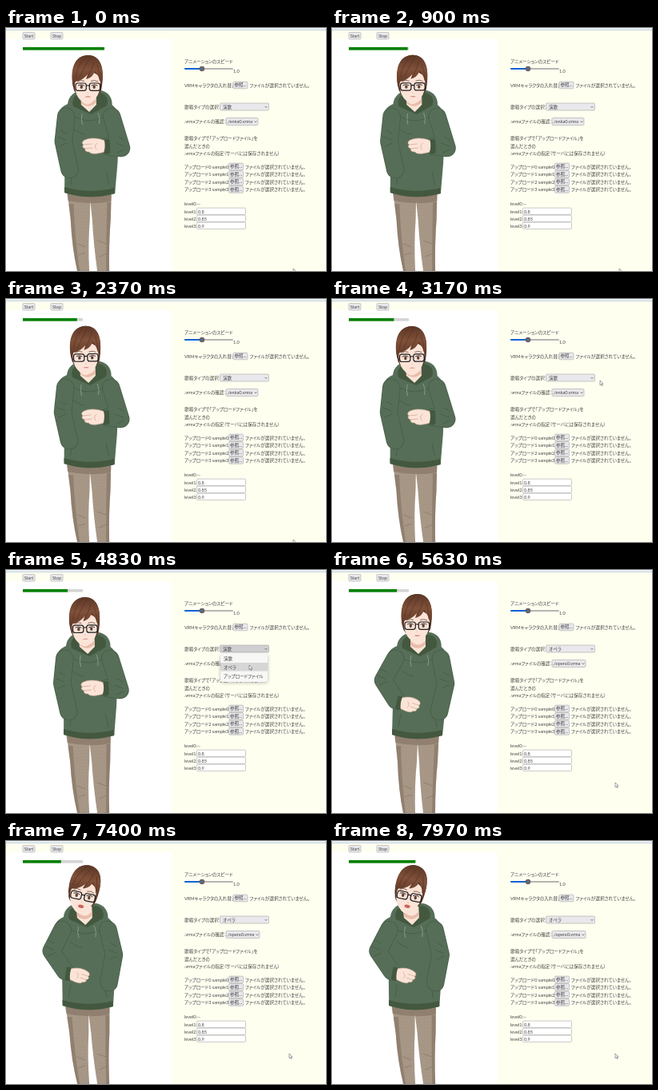
These frames come from a looping animation (400x304 px, 8 s). An HTML page:

```html
<!DOCTYPE html>
<html lang="ja">
<head>
<meta charset="utf-8">
<style>
  html, body { margin: 0; width: 100%; height: 100%; overflow: hidden; background: #fffff0; }
  svg { display: block; width: 400px; height: 304px; }
  text { font: 5.6px Lato, "Noto Sans CJK JP", "Noto Sans CJK", sans-serif; font-feature-settings: "palt"; fill: #444; white-space: pre; }
  .cloth { fill: #566e57; }
  .shade { fill: #43583f; }
  .fold { fill: none; stroke: #465c45; stroke-width: .9; stroke-linecap: round; }
  .skin { fill: #fbe4d7; }
  .sleeve { fill: none; stroke-linecap: round; stroke-linejoin: round; }
  .line { fill: none; stroke: #c99884; stroke-width: .6; stroke-linecap: round; }
</style>
</head>
<body>
<svg viewBox="0 0 400 304">
  <defs>
    <linearGradient id="hairTone" x2="0" y2="1">
      <stop stop-color="#5b3625"/><stop offset=".45" stop-color="#80513a"/><stop offset="1" stop-color="#5a3424"/>
    </linearGradient>
    <pattern id="weave" width="3" height="4" patternUnits="userSpaceOnUse">
      <rect width="3" height="4" fill="#ab9b8b"/>
      <path d="M0 4L3 0" stroke="#95836f" stroke-width=".6"/>
    </pattern>
    <filter id="soft" x="-20%" y="-20%" width="140%" height="150%"><feGaussianBlur stdDeviation="2"/></filter>
  </defs>
  <rect width="400" height="304" fill="#fffff0"/>
  <rect width="400" height="2" fill="#e9f1f4"/>
  <rect y="2" width="400" height="1" fill="#c5d5dc"/>
  <rect y="14" width="207" height="290" fill="#fff"/>

  <rect x="21" y="24" width="75" height="3.6" fill="#d5d5d5"/>
  <rect id="meter" x="21" y="24" height="3.6" fill="#008000"/>

  <g id="figure">
    <path d="M78 200L82 240Q83 275 89 304H104Q103 270 106 240L107 216L109 240Q110 270 114 304H129Q129 270 132 240L134 200Z" fill="url(#weave)"/>
    <path d="M78 205H134L133 217Q106 222 79 216ZM82 240Q83 275 89 304H92Q87 265 86 220H80ZM132 240Q129 270 129 304H125Q126 260 128 218H133Z" fill="#7d6b5b" opacity=".5"/>
    <path d="M90 270l10 4M91 284l9-3M115 266l11 4M117 286l10-4" fill="none" stroke="#85705e" stroke-width=".6"/>

    <path class="cloth" d="M81 100C80 88 88 80 96 79L122 78C132 79 139 88 136 101L110 116Z"/>
    <path class="shade" d="M88 98C86 88 91 83 97 83L121 81C130 82 133 90 130 97L110 108Z"/>
    <path class="skin" d="M98 82H117V96L108 105L98 96Z"/>
    <path d="M98 88Q108 99 117 88V93Q108 102 98 94Z" fill="#e8bda9"/>
    <path class="cloth" d="M84 94C73 98 68 103 68 116L76 170L75 206Q106 216 138 207L142 170L146 112Q145 102 134 94Q124 106 109 109Q94 105 84 94Z"/>
    <path class="shade" d="M75 199Q106 208 138 200V207Q106 216 75 206Z"/>
    <path class="fold" d="M82 107Q96 116 109 116Q128 114 138 103M88 126Q96 133 102 133M86 180L83 196M128 180L131 196"/>
    <path d="M99 107Q97 115 99 121M119 106Q122 113 120 120" fill="none" stroke="#a0ab98" stroke-width=".7"/>
    <g id="arms"></g>
    <g id="hand">
      <path class="skin" stroke="#dcb5a3" stroke-width=".6" d="M-2-7C-12-11-22-11-29-7Q-32-4-29-2Q-32 1-27 3Q-28 7-22 7Q-20 10-12 9L-2 7Z"/>
      <path class="line" d="M-29-2L-19-3M-27 3L-18 2M-12-4Q-17 0-13 4"/>
      <path class="shade" d="M-3-8Q1-10 4-8L4 8Q0 11-4 8Q-1 0-3-8Z"/>
    </g>
  </g>

  <g id="head">
    <path d="M89 74C84 54 87 31 106 30C123 30 128 47 123 74L120 79H92Z" fill="#553224"/>
    <path class="skin" d="M90 58C89 74 92 82 98 87Q106 96 113 87C119 82 123 74 122 58Q106 42 90 58Z"/>
    <path d="M88 70C84 50 88 31 106 30C123 30 128 48 123 70C122 62 120 56 115 50C113 56 109 59 104 60L106 54C101 60 96 62 91 63Z" fill="url(#hairTone)"/>
    <path d="M104 32Q93 42 91 58M109 33Q101 46 96 58M114 38Q111 50 106 57M118 42Q122 52 121 62" fill="none" stroke="#54311f" stroke-width=".6"/>
    <path d="M93 63Q98 60.5 102 62.5M110 62.5Q115 60.5 119 63" fill="none" stroke="#6b483a" stroke-width=".8"/>
    <path d="M94 68Q98 65.5 102 68.2M110.5 68.2Q115 65.5 118.5 68" fill="none" stroke="#30201c" stroke-width=".9"/>
    <ellipse cx="98.3" cy="69.8" rx="1.7" ry="2.2" fill="#5a4238"/>
    <ellipse cx="114.2" cy="69.8" rx="1.7" ry="2.2" fill="#5a4238"/>
    <g fill="none" stroke="#1d1d20" stroke-width="1.2">
      <rect x="91" y="65" width="13.3" height="9.3" rx="2.8"/>
      <rect x="108.3" y="65" width="13.3" height="9.3" rx="2.8"/>
      <path d="M104.3 68.5Q106.3 67 108.3 68.5"/>
    </g>
    <path class="line" d="M106 77l.8 .8"/>
    <ellipse id="mouth" cx="106.5" rx="3.6" fill="#cb655c"/>
  </g>

  <g id="page"></g>

  <g id="menu">
    <rect x="268" y="106" width="59" height="35" rx="3" fill="#777" opacity=".55" filter="url(#soft)"/>
    <rect x="268" y="104" width="59" height="36" rx="3" fill="#f7f7f6"/>
    <rect id="hover" x="268" width="59" height="10.5" fill="#d6d6d6"/>
    <text x="272" y="112.5">演歌</text>
    <text x="272" y="123.5">オペラ</text>
    <text x="272" y="134.5">アップロードファイル</text>
  </g>
  <path id="cursor" d="M0 0V5.7L1.4 4.5L2.4 6.7L3.3 6.2L2.3 4.1H4.1Z" fill="#fff" stroke="#444" stroke-width=".5"/>
</svg>
<script>
const LOOP = 8000, MENU_OPEN = 4100, MENU_CLOSE = 5100, BEAT = 400;
const $ = id => document.getElementById(id);

const label = (x, y, text, id = "") => `<text x="${x}" y="${y}" ${id && `id="${id}"`}>${text}</text>`;
const box = (x, y, w, h, fill, id = "") =>
  `<rect x="${x}" y="${y}" width="${w}" height="${h}" rx="1.3" fill="${fill}" stroke="#a5a5a3" stroke-width=".6" ${id && `id="${id}"`}/>`;
const button = (x, y, w, text) =>
  box(x, y, w, 8.6, "#e9e9ed") + `<text x="${x + w / 2}" y="${y + 6.2}" text-anchor="middle">${text}</text>`;
const chevron = (x, y, id = "") =>
  `<path id="${id}" d="M${x} ${y}l1.5 1.5l1.5-1.5" fill="none" stroke="#555" stroke-width=".7"/>`;
const filePicker = (x, y) => button(x, y - 6.4, 18, "参照...") + label(x + 20.5, y, "ファイルが選択されていません。");

$("page").innerHTML = [
  button(21, 5.4, 15, "Start"), button(56, 5.4, 15, "Stop"),
  label(223, 44, "アニメーションのスピード"),
  `<rect x="223" y="50" width="61" height="2" rx="1" fill="#b5b5b3"/>
   <rect x="223" y="50" width="22" height="2" rx="1" fill="#0b62d6"/>
   <circle cx="245" cy="51" r="3.3" fill="#66666d"/>`,
  label(284, 56, "1.0"),
  label(223, 73.6, "VRMキャラクタの入れ替え"), filePicker(284, 73.6),
  label(223, 101, "歌唱タイプの選択："),
  box(267.5, 94, 61, 9, "#e9e9ed", "typeBox"), label(271, 101, "", "songType"), chevron(323.5, 98),
  label(223, 119, ".vrmaファイルの確認："),
  box(275, 112.5, 40, 9, "#e9e9ed", "fileBox"), label(276, 119, "", "fileName"),
  chevron(310.5, 116.5, "fileArrow"),
  label(223, 140, "歌唱タイプで「アップロードファイル」を"),
  label(223, 149.5, "選んだときの"),
  label(223, 158.8, ".vrmaファイルの指定（サーバには保存されません）"),
  ...[0, 1, 2, 3].map(i => label(223, 175.5 + i * 9.5, `アップロード${i} sample${i}`) + filePicker(278.5, 175.5 + i * 9.5)),
  label(223, 221.5, "level0:--"),
  ...["0.8", "0.85", "0.9"].map((value, i) => {
    const y = 231.5 + i * 9;
    return label(223, y, `level${i + 1}:`) + box(238.5, y - 6.4, 61, 8.3, "#fff") + label(240, y, value);
  })
].join("");

// Each key is [time, ...values].
const cursorKeys = [[2400, 359, 301], [2750, 390, 215], [3130, 335, 102], [3370, 335, 102], [3500, 346, 108],
  [3850, 320, 98], [4350, 320, 98], [4750, 304, 119], [5120, 304, 119], [5560, 354, 266]];
const meterKeys = [[0, 102], [1630, 80], [3170, 58], [4830, 58], [5630, 62], [6770, 74], [7970, 85]];
// head x, head y, head tilt, body lean, mouth opening
const poseKeys = [[0, -4, 4, 0, -4, .5], [1630, -6, 3.5, -1, -5, .5], [3170, -6, 4, -1, -5, .4], [4830, -7, 4, -1, -6, .4],
  [5100, -7, 4, -1, -6, .4], [5630, 0, 0, 0, 0, .6], [6770, -16, -1, 12, -10, 2.2], [7970, -15, -1, 12, -8, 2]];
// left elbow, left wrist, right elbow, right wrist
const armKeys = [[5120, 75, 142, 82, 177, 147, 150, 131, 148], [5420, 64, 138, 80, 163, 142, 142, 134, 177]];

const ease = p => p * p * (3 - 2 * p);

function sample(keys, t, curve = ease) {
  const next = keys.findIndex(key => key[0] > t);
  if (next === 0) return keys[0].slice(1);
  if (next < 0) return keys.at(-1).slice(1);
  const a = keys[next - 1], b = keys[next], p = curve((t - a[0]) / (b[0] - a[0]));
  return a.slice(1).map((value, i) => value + (b[i + 1] - value) * p);
}

const set = (id, attributes) => {
  for (const name in attributes) $(id).setAttribute(name, attributes[name]);
};

const sleeve = (sx, ex, ey, wx, wy) => {
  const d = `M${sx} 111L${ex} ${ey}L${wx} ${wy}`;
  return `<path class="sleeve" d="${d}" stroke="#465c45" stroke-width="22.5"/>
    <path class="sleeve" d="${d}" stroke="#566e57" stroke-width="21"/>
    <path class="fold" d="M${ex - 7} ${ey - 6}l10 4M${ex - 5} ${ey + 6}l9-4M${ex - 3} ${ey - 14}l7 4"/>`;
};

function drawSinger(t) {
  const [hx, hy, tilt, lean, mouth] = sample(poseKeys, t);
  const [lex, ley, lwx, lwy, rex, rey, rwx, rwy] = sample(armKeys, t);
  set("head", { transform: `translate(${hx} ${hy}) rotate(${tilt} 106 95)` });
  set("mouth", { cy: 82 + mouth * .2, ry: mouth });
  // The feet stay planted while the upper body leans.
  set("figure", { transform: `matrix(1 0 ${-lean * .005} 1 ${lean * 1.5} 0)` });
  $("arms").innerHTML = sleeve(79, lex, ley, lwx, lwy) + sleeve(136, rex, rey, rwx, rwy);
  set("hand", { transform: lwy < 170
    ? `translate(${lwx + 4} ${lwy + 3}) rotate(12) scale(-.85 .95)`
    : `translate(${rwx - 2} ${rwy})` });
}

function drawPage(t) {
  const opera = t >= MENU_CLOSE, open = t >= MENU_OPEN && !opera;
  const [x, y] = sample(cursorKeys, t);
  const dip = 32 * Math.sin(Math.PI * t / BEAT) ** 2;
  set("meter", { width: sample(meterKeys, t, p => p)[0] - dip });
  set("cursor", { transform: `translate(${x} ${y})` });
  set("menu", { visibility: open ? "visible" : "hidden" });
  set("hover", { y: y > 115 ? 116 : 105 });
  set("typeBox", { fill: open ? "#cfcfd3" : "#e9e9ed" });
  set("fileBox", { width: opera ? 42 : 40 });
  set("fileArrow", { transform: `translate(${opera ? 2 : 0} 0)` });
  $("songType").textContent = opera ? "オペラ" : "演歌";
  $("fileName").textContent = opera ? "./opera0.vrma" : "./enka0.vrma";
}

function frame() {
  const t = performance.now() % LOOP;
  drawSinger(t);
  drawPage(t);
  requestAnimationFrame(frame);
}
frame();
</script>
</body>
</html>
```
